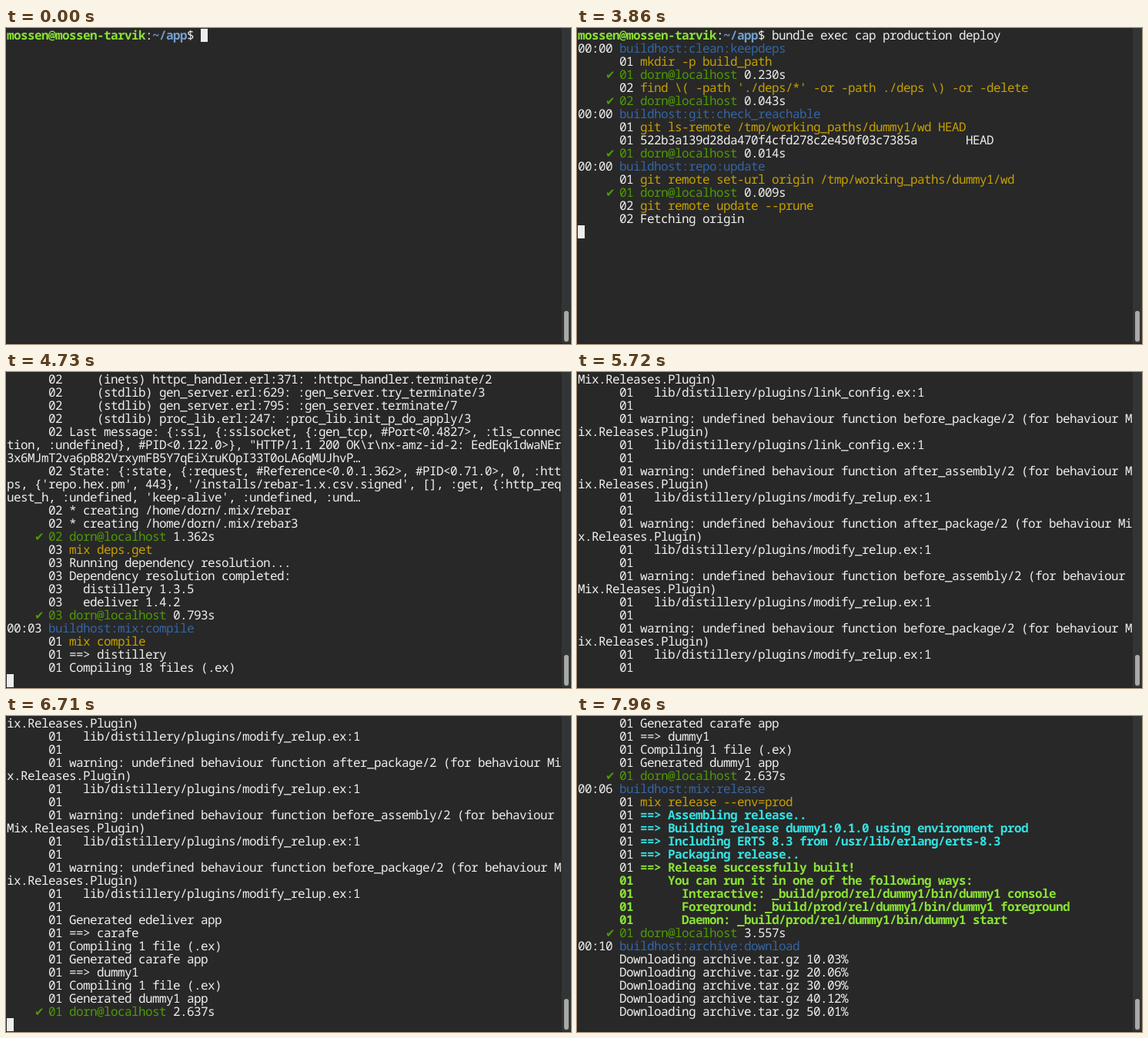
An HTML page for the animation above (8 s loop, 734 by 410 pixels).

```html
<!DOCTYPE html>
<html lang="en">
<head>
<meta charset="utf-8">
<title>Terminal deploy</title>
<style>
  html, body { margin: 0; width: 100%; height: 100%; overflow: hidden; background: #282828; }
  #screen {
    position: absolute; left: 1px; top: 1px;
    font: 16px/17px "Noto Sans Mono", monospace;
    font-variant-ligatures: none; text-rendering: geometricPrecision;
    white-space: pre; color: #eeeeec;
  }
  #screen div { height: 17px; }
  #cursor { position: absolute; width: 9px; height: 17px; background: #eeeeec; }
  #track { position: absolute; right: 0; top: 0; width: 12px; height: 410px; background: #323535; }
  #thumb { position: absolute; left: 725px; top: 367px; width: 6px; height: 40px; border-radius: 3px; background: #a8a8a6; }
  #edge { position: absolute; left: 0; top: 409px; width: 734px; height: 1px; background: #2b2027; }
  .blue { color: #3465a4; }
  .yellow { color: #c4a000; }
  .green { color: #4e9a06; }
  .lime { color: #8ae234; font-weight: bold; }
  .cyan { color: #34e2e2; font-weight: bold; }
  .path { color: #729fcf; font-weight: bold; }
  .tick { display: inline-block; width: 9px; line-height: 0; letter-spacing: 0; color: #4e9a06; font-family: "DejaVu Sans", sans-serif; font-size: 15px; }
</style>
</head>
<body>
<div id="track"></div><div id="thumb"></div><div id="edge"></div>
<div id="screen"></div><div id="cursor"></div>
<script>
const LOOP = 8000, CELL = 9, LINE = 17, COLS = 80, VISIBLE = 23;
const COMMAND = 'bundle exec cap production deploy';
const PROMPT = [['lime', 'mossen@mossen-tarvik'], ['', ':'], ['path', '~/app'], ['', '$ ']];
const PROMPT_COLS = 28;
const screen = document.getElementById('screen');
const cursor = document.getElementById('cursor');

// A row is a list of [class, text]; a state is the screen from a given time on.
const rows = [[]];
const states = [];
const type = (time, typed, blink = false) => states.push({ time, typed, blink, count: 1 });
const at = (time, blink = false) =>
  states.push({ time, typed: COMMAND.length, blink, count: rows.length, below: true });

const pad = ' '.repeat(6);
const task = (time, name) => rows.push([['', time + ' '], ['blue', 'buildhost:' + name]]);
const run = (n, text) => rows.push([['', `${pad}0${n} `], ['yellow', text]]);
const ok = (n, time) =>
  rows.push([['', '    '], ['tick', '✔'], ['green', ` 0${n} dorn@localhost`], ['', ` ${time}s`]]);
const paint = (n, style, text) => rows.push([['', `${pad}0${n} `], [style, text]]);
const lime = text => rows.push([['lime', `${pad}01     ${text}`]]);
const out = (n, ...lines) => {
  for (const line of lines) {
    const text = `${pad}0${n} ${line}`;
    for (let i = 0; i < text.length; i += COLS) rows.push([['', text.slice(i, i + COLS)]]);
  }
};
const download = percent => rows.push([['', `${pad}Downloading archive.tar.gz ${percent}%`]]);

type(0, 0, true);
type(560, 2, true);
type(820, 4);
type(900, 6);
type(980, 8);
type(1280, 10);
type(1370, 11);
type(1770, 14);
type(1870, 16, true);
type(2060, 18);
type(2150, 20);
type(2250, 22);
type(2400, 24);
type(2440, 26);
type(2580, 28);
type(2720, 30, true);
type(2870, 32, true);
at(3060, true);

task('00:00', 'clean:keepdeps');
run(1, 'mkdir -p build_path');
at(3460);
ok(1, '0.230');
run(2, String.raw`find \( -path './deps/*' -or -path ./deps \) -or -delete`);
at(3560);
ok(2, '0.043');
task('00:00', 'git:check_reachable');
run(1, 'git ls-remote /tmp/working_paths/dummy1/wd HEAD');
at(3660);
out(1, '522b3a139d28da470f4cfd278c2e450f03c7385a       HEAD');
ok(1, '0.014');
task('00:00', 'repo:update');
run(1, 'git remote set-url origin /tmp/working_paths/dummy1/wd');
at(3760, true);
ok(1, '0.009');
run(2, 'git remote update --prune');
out(2, 'Fetching origin');
at(3860, true);
ok(2, '0.018');
task('00:00', 'git:checkout');
run(1, 'git reset --hard 522b3a139d28da470f4cfd278c2e450f03c7385a');
at(3960, true);
out(1, 'HEAD is now at 522b3a1 Update dependencies');
ok(1, '0.012');
task('00:00', 'mix:deps');
run(1, 'mix local.hex --force');
at(4060, true);
out(1, '* creating /home/dorn/.mix/archives/hex-0.16.0');
ok(1, '1.104');
at(4160, true);
run(2, 'mix local.rebar --force');
at(4260);
out(2, '', '[error] GenServer #PID<0.122.0> terminating',
  '** (FunctionClauseError) no function clause matching in :httpc_handler',
  '    (inets) httpc_handler.erl:371: :httpc_handler.terminate/2',
  '    (stdlib) gen_server.erl:629: :gen_server.try_terminate/3',
  '    (stdlib) gen_server.erl:795: :gen_server.terminate/7',
  '    (stdlib) proc_lib.erl:247: :proc_lib.init_p_do_apply/3',
  String.raw`Last message: {:ssl, {:sslsocket, {:gen_tcp, #Port<0.4827>, :tls_connection, :undefined}, #PID<0.122.0>}, "HTTP/1.1 200 OK\r\nx-amz-id-2: EedEqk1dwaNEr3x6MJmT2va6pB82VrxymFB5Y7qEiXruKOpI33T0oLA6qMUJhvP…`,
  "State: {:state, {:request, #Reference<0.0.1.362>, #PID<0.71.0>, 0, :https, {'repo.hex.pm', 443}, '/installs/rebar-1.x.csv.signed', [], :get, {:http_request_h, :undefined, 'keep-alive', :undefined, :und…");
at(4360);
out(2, '* creating /home/dorn/.mix/rebar', '* creating /home/dorn/.mix/rebar3');
ok(2, '1.362');
run(3, 'mix deps.get');
at(4510, true);
out(3, 'Running dependency resolution...', 'Dependency resolution completed:',
  '  distillery 1.3.5', '  edeliver 1.4.2');
at(4580, true);
ok(3, '0.793');
task('00:03', 'mix:compile');
run(1, 'mix compile');
at(4660, true);
out(1, '==> distillery', 'Compiling 18 files (.ex)');
at(4730, true);
out(1, 'Generated distillery app', '==> edeliver', 'Compiling 7 files (.ex)');
for (const plugin of ['link_config', 'modify_relup']) {
  for (const hook of ['after_assembly', 'after_package', 'before_assembly', 'before_package'])
    out(1, `warning: undefined behaviour function ${hook}/2 (for behaviour Mix.Releases.Plugin)`,
      `  lib/distillery/plugins/${plugin}.ex:1`, '');
  at(plugin === 'link_config' ? 5680 : 5720);
}
out(1, 'Generated edeliver app', '==> carafe');
at(5870);
out(1, 'Compiling 1 file (.ex)');
at(6560);
out(1, 'Generated carafe app', '==> dummy1', 'Compiling 1 file (.ex)');
at(6580);
out(1, 'Generated dummy1 app');
ok(1, '2.637');
at(6670, true);
task('00:06', 'mix:release');
run(1, 'mix release --env=prod');
at(6760, true);
paint(1, 'cyan', '==> Assembling release..');
paint(1, 'cyan', '==> Building release dummy1:0.1.0 using environment prod');
paint(1, 'cyan', '==> Including ERTS 8.3 from /usr/lib/erlang/erts-8.3');
at(6850, true);
paint(1, 'cyan', '==> Packaging release..');
paint(1, 'lime', '==> Release successfully built!');
lime('You can run it in one of the following ways:');
lime('  Interactive: _build/prod/rel/dummy1/bin/dummy1 console');
lime('  Foreground: _build/prod/rel/dummy1/bin/dummy1 foreground');
lime('  Daemon: _build/prod/rel/dummy1/bin/dummy1 start');
at(6940, true);
ok(1, '3.557');
task('00:10', 'archive:download');
download('10.03');
at(7030);
download('20.06');
download('30.09');
at(7490);
download('40.12');
download('50.01');
at(7960);

function rowElement(parts) {
  const row = document.createElement('div');
  for (const [style, text] of parts) {
    const span = document.createElement('span');
    span.className = style;
    span.textContent = text;
    row.append(span);
  }
  return row;
}

function show({ typed, blink, count, below }) {
  rows[0] = [...PROMPT, ['', COMMAND.slice(0, typed)]];
  screen.replaceChildren(...rows.slice(Math.max(0, count - VISIBLE), count).map(rowElement));
  cursor.hidden = !blink;
  cursor.style.left = 1 + (below ? 0 : PROMPT_COLS + typed) * CELL + 'px';
  cursor.style.top = 1 + (below ? Math.min(count, VISIBLE) : 0) * LINE + 'px';
}

// Set the type on the terminal's cell grid.
const probe = document.createElement('span');
probe.textContent = '0'.repeat(COLS);
screen.append(probe);
screen.style.letterSpacing = CELL - probe.getBoundingClientRect().width / COLS + 'px';

let current;
function tick() {
  const time = performance.now() % LOOP;
  const state = states.findLast(s => s.time <= time);
  if (state !== current) show(current = state);
  requestAnimationFrame(tick);
}
tick();
</script>
</body>
</html>
```
